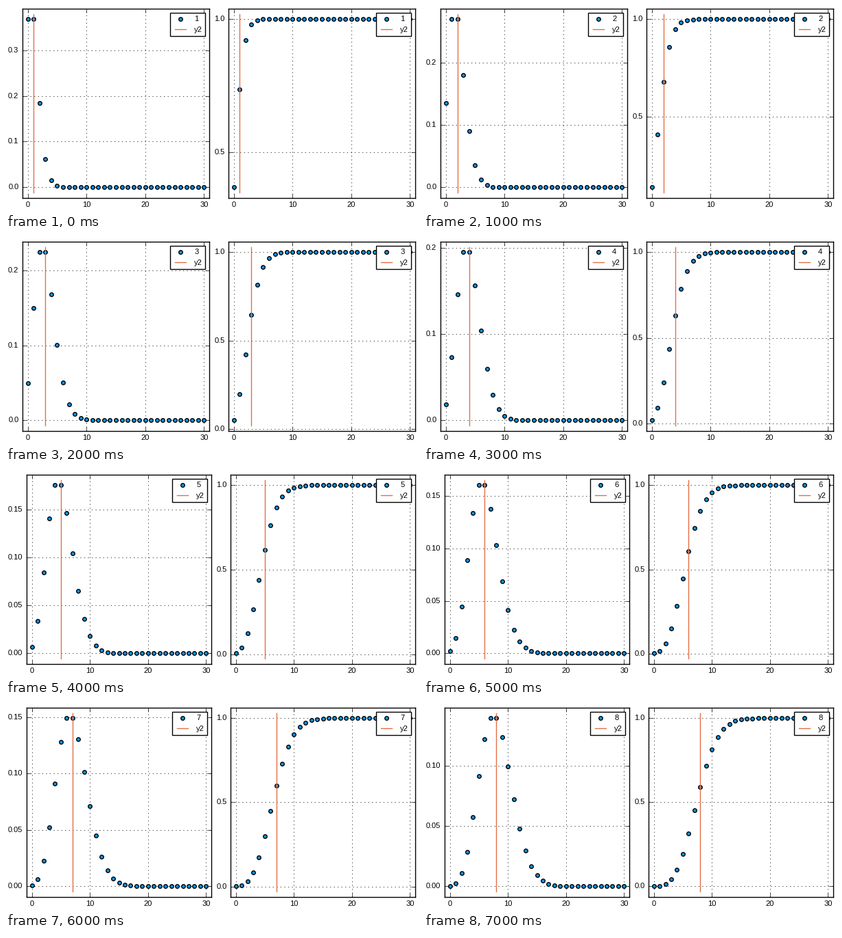
Write a matplotlib script that moves like this. It is 600 by 300 pixels and loops after 8000 ms.

```python
from math import exp, factorial

import matplotlib.pyplot as plt
import numpy as np
from matplotlib.animation import FuncAnimation

W, H, DPI = 600, 300, 100
TOP, BOTTOM = 4, 280.6
BLUE, ORANGE = "#009afa", "#e36f47"

plt.style.use("classic")
plt.rcParams.update({
    "font.family": "Liberation Sans",
    "font.size": 8,
    "axes.labelsize": 8,
    "xtick.labelsize": 8,
    "ytick.labelsize": 8,
    "legend.fontsize": 8,
    "legend.scatterpoints": 1,
    "axes.axisbelow": True,
})

fig = plt.figure(figsize=(W / DPI, H / DPI), dpi=DPI, facecolor="white")
axes = [fig.add_axes([0, 0, 0.4, 1]), fig.add_axes([0.5, 0, 0.4, 1])]
k = np.arange(31)


def padded(lo, hi):
    """Widen a range by 3% on each side."""
    pad = 0.03 * (hi - lo)
    return lo - pad, hi + pad


def place(ax, left, right):
    ax.set_position([left / W, 1 - BOTTOM / H,
                     (right - left) / W, (BOTTOM - TOP) / H])


def draw_panel(ax, values, mean, step, digits):
    ax.clear()
    ax.scatter(k, values, s=16, c=BLUE, edgecolors="k", linewidths=1,
               label=str(mean))
    span = padded(values.min(), values.max())
    ax.plot([mean, mean], span, color=ORANGE, lw=1, label="y2")

    lo, hi = padded(*span)
    ax.set_xlim(*padded(0, 30))
    ax.set_ylim(lo, hi)
    ticks = [i * step for i in range(10) if lo <= i * step <= hi]
    ax.set_yticks(ticks, [f"{t:.{digits}f}" for t in ticks])
    ax.set_xticks([0, 10, 20, 30])
    ax.grid(True)
    ax.legend(loc="upper right")


def update(i):
    mean = i + 1
    pmf = np.array([exp(-mean) * mean**n / factorial(n) for n in range(31)])
    fine = mean >= 5  # longer tick labels narrow both panels
    place(axes[0], *((30, 299) if fine else (24, 296)))
    place(axes[1], 327 if fine else 324, 596)
    draw_panel(axes[0], pmf, mean, 0.05 if fine else 0.1, 2 if fine else 1)
    draw_panel(axes[1], np.cumsum(pmf), mean, 0.5, 1)
    return []


anim = FuncAnimation(fig, update, frames=8, interval=1000, repeat=True,
                     repeat_delay=0, init_func=lambda: update(0))
plt.show()
```
